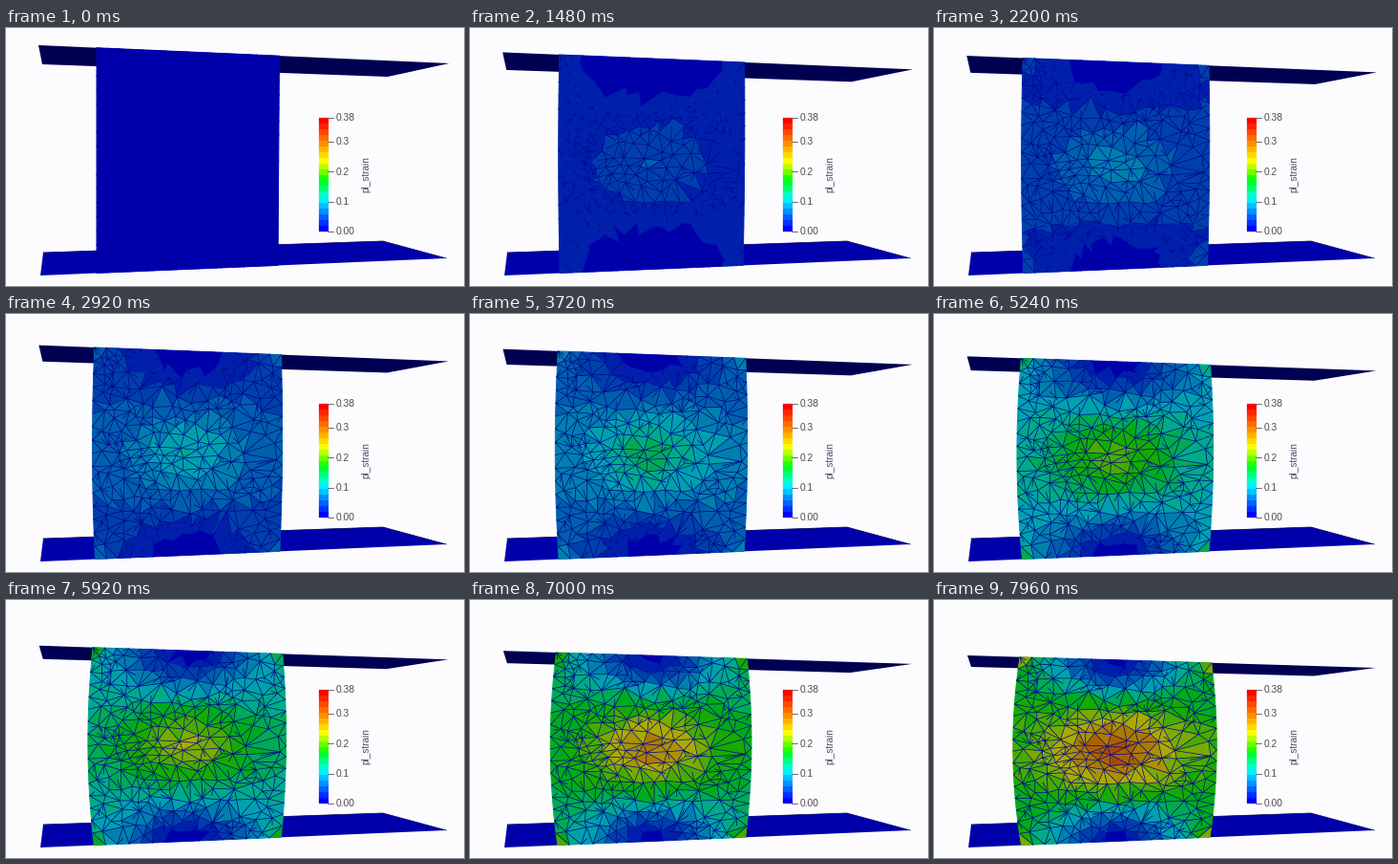
These frames come from a looping animation (480 by 270 pixels, 8000 ms). A matplotlib script:

```python
import colorsys
import numpy as np
import matplotlib.pyplot as plt
from matplotlib.animation import FuncAnimation
from matplotlib.collections import LineCollection, PolyCollection
from matplotlib.patches import Polygon, Rectangle
from matplotlib.tri import Triangulation

W, H, DPI = 480, 270, 100
FRAMES, STEP = 200, 40
PX = 72 / DPI
BANDS, S_MAX = 20, 0.38
SHADE = 0.67
rng = np.random.default_rng(11)

fig = plt.figure(figsize=(W / DPI, H / DPI), dpi=DPI, facecolor="#fcfcff")
ax = fig.add_axes([0, 0, 1, 1])
ax.set_xlim(0, W)
ax.set_ylim(H, 0)
ax.axis("off")


def band_color(k):
    hue = np.interp(k / (BANDS - 1), [0, 0.28, 0.45, 0.63, 1],
                    [240, 180, 120, 60, 0])
    return colorsys.hsv_to_rgb(hue / 360, 1, 1)


RAINBOW = np.array([band_color(k) for k in range(BANDS)])


def lerp(a, b, t):
    return a + (b - a) * t


# Plates: the lower one stands still, the upper one comes down.
TOP_START = np.array([(34, 18), (464.5, 37), (400, 51), (38, 38)], float)
TOP_END = np.array([(35, 58), (463, 71), (398, 79.5), (39, 70)], float)
BASE = np.array([(36, 259), (461.5, 241), (395, 223), (39, 235)], float)


def on_line(p, q, x):
    return p[1] + (q[1] - p[1]) * (x - p[0]) / (q[0] - p[0])


def place(u, v, t):
    """Stage position of block point (u, v) at progress t."""
    ends = t ** 0.8
    bulge = 4 * v * (1 - v)
    left = 95 - lerp(5, 3.5, v) * ends - bulge * (12.2 * t - 4.2 * ends)
    right = lerp(286.5, 285, v) + 4.2 * ends + bulge * (10.5 * t - 4.2 * ends)
    x = lerp(left, right, u)
    plate = lerp(TOP_START, TOP_END, t)
    y = lerp(on_line(plate[0], plate[1], x), on_line(BASE[0], BASE[1], x), v)
    return np.stack([x, y], axis=-1)


def hill(x, y, rx, ry):
    return np.exp(-(x / rx) ** 2 - (y / ry) ** 2)


class Strain:
    """Final strain at block points and how it builds up."""

    def __init__(self, points, noise=1.0):
        u, v = points.T
        edge_u, edge_v = np.minimum(u, 1 - u), np.minimum(v, 1 - v)
        core = hill(u - 0.5, v - 0.5, 0.4, 0.25)
        peak = hill(u - 0.5, v - 0.5, 0.2, 0.17)
        dead = hill(u - 0.5, edge_v, 0.32, 0.2)
        corner = hill(edge_u, edge_v, 0.06, 0.07)
        level = (0.167 + 0.105 * core + 0.036 * peak - 0.158 * dead
                 + 0.095 * corner)
        self.level = np.maximum(level, 0) * noise
        self.power = 1.15 - 0.15 * core

    def at(self, t):
        return self.level * t ** self.power


def make_nodes():
    """Even nodes on the rim, scattered ones inside with a least distance."""
    width, height, gap = 191, 222, 6.5
    side = np.linspace(0, 1, 17)
    rim = [(s, e) for s in side for e in (0, 1)]
    rim += [(e, s) for s in side[1:-1] for e in (0, 1)]
    points = [(u * width, v * height) for u, v in rim]
    for p in rng.uniform((4, 4), (width - 4, height - 4), (480, 2)):
        d = np.array(points) - p
        if np.min(np.hypot(d[:, 0], d[:, 1])) > gap:
            points.append(tuple(p))
    return np.array(points) / (width, height)


nodes = make_nodes()
mesh = Triangulation(nodes[:, 0] * 191, nodes[:, 1] * 222)
cells = mesh.triangles
mid = nodes[cells].mean(axis=1)
cell_strain = Strain(mid, rng.uniform(0.96, 1.03, len(cells)))

# Inner mesh edges plus some short spokes inside the cells
edges = nodes[mesh.edges]
centre = edges.mean(axis=1)
edges = edges[np.all((centre > 0.002) & (centre < 0.998), axis=1)]
spoked = rng.random(len(cells)) < 0.2
spokes = np.stack([nodes[cells[spoked, 0]], mid[spoked]], axis=1)
lines = np.concatenate([edges, spokes])
flip = rng.random(len(lines)) < 0.5
lines[flip] = lines[flip, ::-1]
line_strain = Strain(lines.mean(axis=1))
line_luck = rng.uniform(-0.25, 0.25, len(lines))

top_plate = Polygon(TOP_START, facecolor=(0, 0, 0.32), edgecolor="none")
ax.add_patch(top_plate)
ax.add_patch(Polygon(BASE, facecolor=(0, 0, SHADE), edgecolor="none"))
ax.plot(*BASE[[3, 2, 1]].T, color=(0, 0, 0.35), lw=0.7 * PX)

block = PolyCollection([], linewidths=0.9 * PX, zorder=3)
wires = LineCollection([], colors=[(0, 0.02, 0.55)], linewidths=0.7 * PX,
                       zorder=4)
ax.add_collection(block, autolim=False)
ax.add_collection(wires, autolim=False)


def draw_legend():
    x, top, bottom = 328, 94, 213
    h = (bottom - top) / BANDS
    for k, color in enumerate(RAINBOW):
        ax.add_patch(Rectangle((x, bottom - (k + 1) * h), 9.5, h,
                               facecolor=color, edgecolor=color,
                               lw=0.2 * PX))
    ink = (0.3, 0.3, 0.32)
    for value, label in ((0, "0.00"), (0.1, "0.1"), (0.2, "0.2"),
                         (0.3, "0.3"), (0.38, "0.38")):
        y = lerp(bottom, top, value / S_MAX)
        ax.plot([337, 342.5], [y, y], color=ink, lw=0.8 * PX)
        ax.text(345.5, y + 3.2, label, color=ink, fontsize=10.2 * PX,
                family="Liberation Sans", va="baseline")
    ax.text(377.5, 153, "pl_strain", color=(0.32, 0.3, 0.4), rotation=90,
            fontsize=10 * PX, family="Liberation Sans",
            ha="center", va="center")


draw_legend()


def update(i):
    t = i / (FRAMES - 1)
    top_plate.set_xy(lerp(TOP_START, TOP_END, t))

    pos = place(nodes[:, 0], nodes[:, 1], t)
    band = (cell_strain.at(t) / S_MAX * BANDS).astype(int)
    colors = RAINBOW[np.clip(band, 0, BANDS - 1)] * SHADE
    block.set_verts(pos[cells])
    block.set_facecolor(colors)
    block.set_edgecolor(colors)

    # Wires show up piece by piece as the strain grows.
    part = np.clip((line_strain.at(t) - 0.022) / 0.02 + line_luck, 0, 1)
    shown = part > 0.02
    a = lines[shown, 0]
    b = lerp(a, lines[shown, 1], part[shown, None])
    ends = np.stack([a, b], axis=1)
    wires.set_segments(place(ends[..., 0], ends[..., 1], t))
    return top_plate, block, wires


anim = FuncAnimation(fig, update, frames=FRAMES, interval=STEP,
                     init_func=lambda: update(0), repeat=True,
                     repeat_delay=0, blit=False)
plt.show()
```
